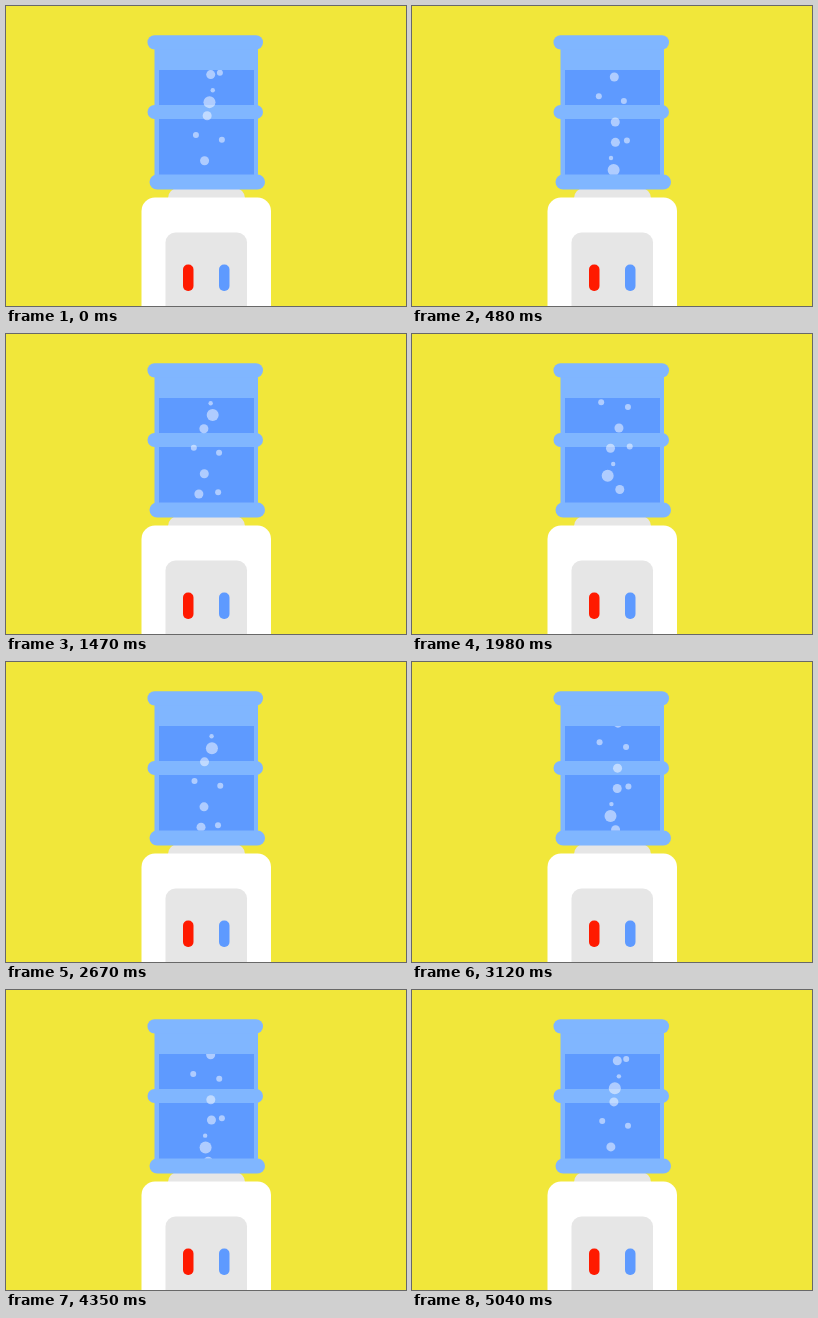
These frames come from a looping animation (400x300 px, 5070 ms). An HTML page:

```html
<!DOCTYPE html>
<html lang="en">
<head>
<meta charset="utf-8">
<title>Water cooler</title>
<style>
  html, body { margin: 0; height: 100%; overflow: hidden; background: #f1e73a; }
  svg { display: block; width: 400px; height: 300px; }
</style>
</head>
<body>
<svg viewBox="0 0 400 300">
  <clipPath id="water"><rect x="153" y="64" width="95" height="104.5"/></clipPath>
  <rect width="400" height="300" fill="#f1e73a"/>
  <rect x="162" y="182" width="77" height="30" rx="10" fill="#e6e6e6"/>
  <rect x="135.5" y="191.5" width="129.5" height="130" rx="13.5" fill="#fff"/>
  <rect x="159.5" y="226.5" width="81.5" height="100" rx="10" fill="#e6e6e6"/>
  <rect x="177" y="258.5" width="10.5" height="26.5" rx="5" fill="#ff1a00"/>
  <rect x="213" y="258.5" width="10.5" height="26.5" rx="5" fill="#5e9aff"/>
  <g fill="#80b6ff">
    <rect x="148.5" y="36" width="103.5" height="140"/>
    <rect x="153" y="64" width="95" height="105" fill="#5e9aff"/>
    <rect x="141.5" y="29.2" width="115.5" height="14.3" rx="7"/>
    <rect x="141.5" y="99" width="115.5" height="14" rx="7"/>
    <rect x="143.5" y="168.5" width="115.5" height="15" rx="7.5"/>
  </g>
  <g id="bubbles" fill="#fff" fill-opacity=".5" clip-path="url(#water)"></g>
</svg>
<script>
const LOOP = 5070, CYCLE = LOOP / 4, STEP = 30;
const FLOOR = 169, SPEED = 0.084, SURGE = 28;

// Each bubble leaves the floor at `start` ms and sways around x;
// `crest` is the height of its rightmost point, `wave` the height of one sway.
const bubble = (r, start, x, sway, crest, wave) => ({ r, start, x, sway, crest, wave });
const bubbles = [
  bubble(4.5, -170, 202.5, 4.5, 77, 108),
  bubble(4.5, 72, 199, 6.5, 40, 56),
  bubble(3, 50, 215, 3, 65, 120),
  bubble(2.2, 258, 203, 4, 78, 120),
  bubble(6, 400, 201, 6, 94, 116),
  bubble(4.5, 562, 203.8, 6, 27, 100),
  bubble(3, 790, 189.5, 2.8, 13, 120),
  bubble(3, 847, 213.5, 2.5, 32, 66)
];

const group = document.getElementById("bubbles");
const circles = bubbles.flatMap(b => [-1, 0, 1].map(turn => {
  const el = document.createElementNS("http://www.w3.org/2000/svg", "circle");
  el.setAttribute("r", b.r);
  group.append(el);
  return { el, b, turn };
}));

function draw(time) {
  const t = Math.floor(time % LOOP / STEP) * STEP % CYCLE;
  // the whole stream slows down and catches up once per cycle
  const flow = t - SURGE * Math.sin(2 * Math.PI * t / CYCLE);
  for (const { el, b, turn } of circles) {
    const height = SPEED * (flow + turn * CYCLE - b.start);
    el.setAttribute("cx", b.x + b.sway * Math.cos(2 * Math.PI * (height - b.crest) / b.wave));
    el.setAttribute("cy", FLOOR - height);
  }
}

const begin = performance.now();
function tick() {
  draw(performance.now() - begin);
  requestAnimationFrame(tick);
}
tick();
</script>
</body>
</html>
```
